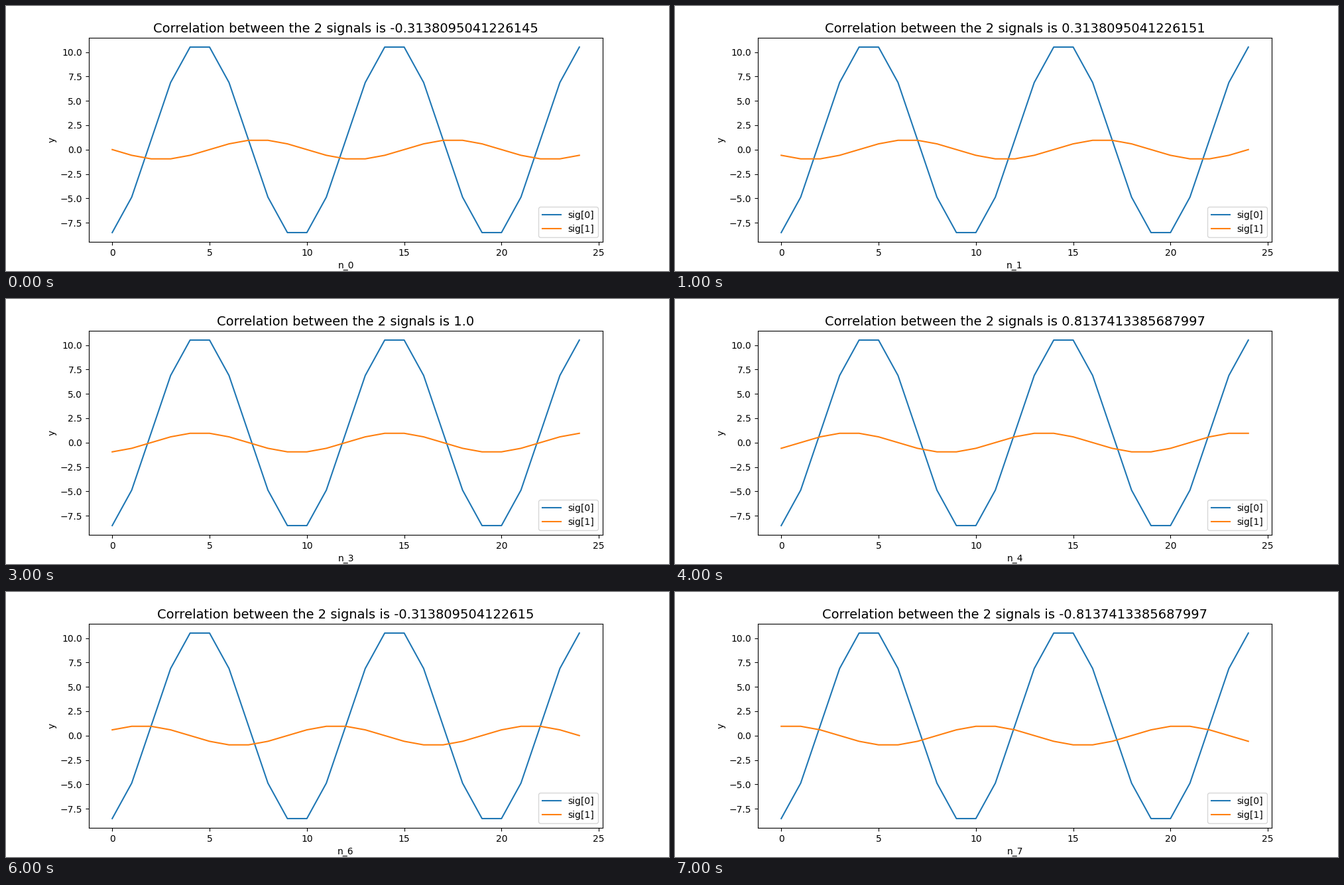
A matplotlib script that plays this animation: 1000x400 px, repeating every 8000 ms.

```python
import numpy as np
import matplotlib.pyplot as plt
from matplotlib.animation import FuncAnimation

PERIOD = 10
STEP_MS = 1000
# Full-precision correlation at each shift, fixed so rounding never varies.
CORRELATIONS = [
    "-0.3138095041226145", "0.3138095041226151",
    "0.8137413385687997", "1.0",
    "0.8137413385687997", "0.3138095041226146",
    "-0.313809504122615", "-0.8137413385687997",
]

n = np.arange(25)


def wave(shift):
    return np.sin(2 * np.pi * (n + shift) / PERIOD)


plt.rcParams["font.family"] = "DejaVu Sans"
fig, ax = plt.subplots(figsize=(10, 4), dpi=100)
ax.plot(n, 1 + 10 * wave(-2), label="sig[0]")
moving, = ax.plot(n, wave(5), label="sig[1]")
ax.set_ylabel("y")
ax.legend(loc="lower right")


def update(step):
    moving.set_ydata(wave(5 + step))
    ax.set_title(f"Correlation between the 2 signals is {CORRELATIONS[step]}",
                 fontsize=14)
    ax.set_xlabel(f"n_{step}")
    return moving, ax.title, ax.xaxis.label


anim = FuncAnimation(fig, update, frames=len(CORRELATIONS),
                     interval=STEP_MS, repeat=True)
plt.show()
```
